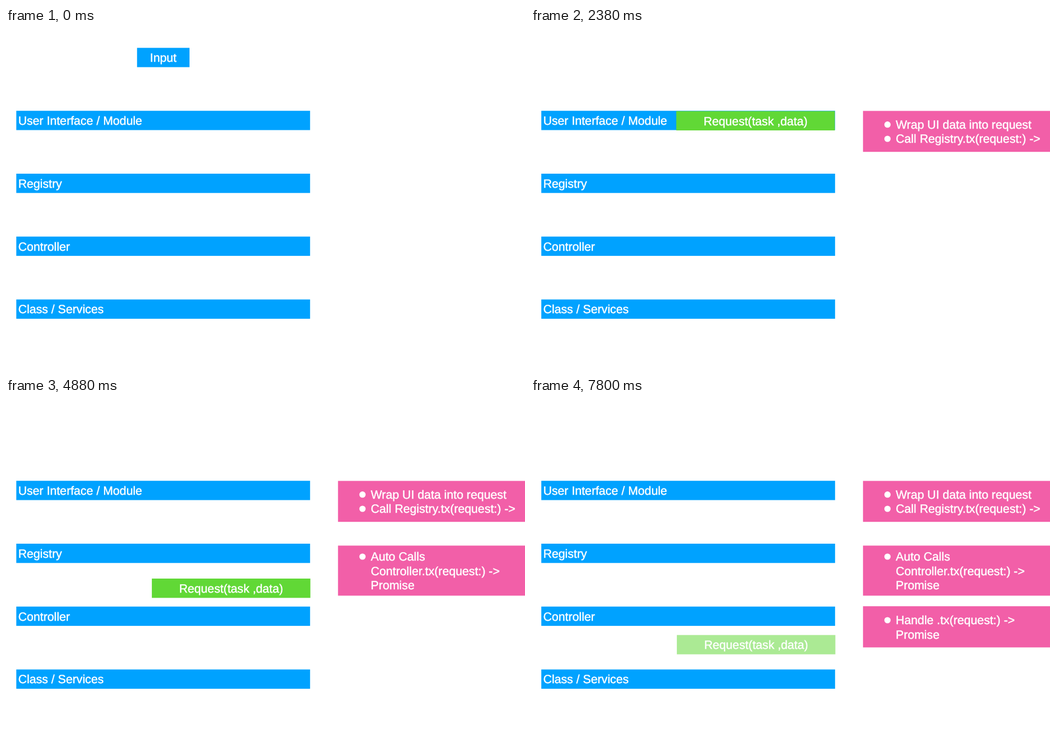
These frames come from a looping animation (922x608 px, 8000 ms). An HTML page:

```html
<!DOCTYPE html>
<html lang="en">
<head>
<meta charset="utf-8">
<title>Request flow</title>
<style>
  html, body { margin: 0; width: 100%; height: 100%; overflow: hidden; background: #fff; }
  svg { display: block; width: 100%; height: 100%; }
  text {
    font: 21.2px "Liberation Sans", Arial, sans-serif;
    fill: #fff; stroke: #fff; stroke-width: .45px;
    text-rendering: geometricPrecision;
  }
  .mid { text-anchor: middle; }
  .row { fill: #00a2ff; }
  .request { fill: #61d836; }
  .note { fill: #f25fa8; }
  .dot { fill: #fff; }
</style>
</head>
<body>
<svg viewBox="0 0 922 608">
  <g id="rows"></g>
  <g id="notes"></g>
  <g id="request">
    <rect class="request" width="281.6" height="34.3"/>
    <text class="mid" x="140.8" y="24.8">Request(task ,data)</text>
  </g>
  <g id="input">
    <rect class="row" width="93.2" height="34.3"/>
    <text class="mid" x="46.6" y="24.8">Input</text>
  </g>
</svg>
<script>
const LOOP = 8000, STEP = 1000 / 4.8, PHASE = 490;
const GAP = 111.8, TOP = 147.2, LINE = 25.3;
const byId = id => document.getElementById(id);

function add(parent, tag, attrs, text) {
  const el = document.createElementNS("http://www.w3.org/2000/svg", tag);
  for (const key in attrs) el.setAttribute(key, attrs[key]);
  if (text) el.textContent = text;
  return parent.appendChild(el);
}

["User Interface / Module", "Registry", "Controller", "Class / Services"].forEach((name, i) => {
  const y = TOP + i * GAP;
  add(byId("rows"), "rect", { class: "row", x: 18.3, y, width: 521.9, height: 34.3 });
  add(byId("rows"), "text", { x: 21.7, y: y + 24.8 }, name);
});

// Lines that begin with "*" carry a bullet.
const notes = [
  { y: 147.4, h: 72.8, base: 179, start: 1330, lines: ["*Wrap UI data into request", "*Call Registry.tx(request:) ->"] },
  { y: 262.4, h: 89, base: 289.3, start: 3330, lines: ["*Auto Calls", "Controller.tx(request:) ->", "Promise"] },
  { y: 370.2, h: 73.2, base: 402.3, start: 5340, lines: ["*Handle .tx(request:) ->", "Promise"] }
];
for (const note of notes) {
  note.el = add(byId("notes"), "g", {});
  add(note.el, "rect", { class: "note", x: 589.8, y: note.y, width: 340, height: note.h });
  note.lines.forEach((line, i) => {
    const y = note.base + i * LINE;
    if (line[0] === "*") add(note.el, "circle", { class: "dot", cx: 633.3, cy: y - 7.3, r: 5.6 });
    add(note.el, "text", { x: 648, y }, line.replace("*", ""));
  });
}

const ramp = (t, start) => Math.min(1, Math.max(0, (t - start) / 1000));
const ease = p => (1 - Math.cos(Math.PI * p)) / 2;

function place(el, x, y, opacity) {
  el.setAttribute("transform", `translate(${x} ${y})`);
  el.setAttribute("opacity", opacity);
}

function draw(t) {
  const drop = ramp(t, 330);
  place(byId("input"), 232.8, 35.3 + GAP * ease(drop), 1 - drop);

  const first = ease(ramp(t, 2330)), second = ease(ramp(t, 4340)), leave = ramp(t, 7322);
  place(byId("request"), 258.1 + first, TOP + GAP * (first + second + ease(leave)),
    ramp(t, 1330) * (1 - leave));

  for (const note of notes) note.el.setAttribute("opacity", ramp(t, note.start));
}

// The clock advances at 4.8 pictures per second.
function tick() {
  const t = performance.now() % LOOP;
  draw(500 + Math.floor((t - PHASE) / STEP) * STEP);
  requestAnimationFrame(tick);
}
tick();
</script>
</body>
</html>
```
